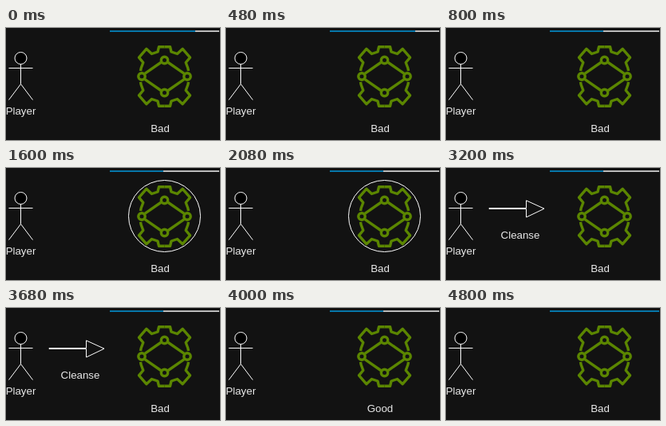
An HTML page that plays this animation: 268x141 px, repeating every 5.6 s.

```html
<!DOCTYPE html>
<html lang="en">
<head>
<meta charset="utf-8">
<title>Cleanse</title>
<style>
  html, body { margin: 0; width: 100%; height: 100%; overflow: hidden; background: #121212; }
  svg { display: block; width: 268px; height: 141px; }
  text { font: 13.3px "Liberation Sans", Arial, sans-serif; fill: #e8e8e8; text-anchor: middle; }
  .line { fill: none; stroke: #fff; }
  .gear { fill: none; stroke: #5b8600; stroke-width: 3.4; stroke-linejoin: round; }
</style>
</head>
<body>
<svg viewBox="0 0 268 141">
  <defs>
    <g id="quarter">
      <path d="M0-37.3H7L8.5-31 16-28.5 22.7-34.7 32-23.8 26.7-17.5 29.3-10.5 30-7"/>
      <path d="M4-18 24.6-3.6"/>
    </g>
    <g id="half">
      <use href="#quarter"/>
      <use href="#quarter" transform="scale(-1 1)"/>
      <circle cy="-20.5" r="4.2"/>
    </g>
  </defs>

  <rect x="130" y="3" width="137" height="2" fill="#bbb"/>
  <rect id="bar" x="130" y="3" height="2" fill="#0677aa"/>

  <g class="line">
    <circle cx="18.5" cy="38" r="7.5" fill="#000"/>
    <path d="M18.5 45.5V70.5M3.5 50.5H33.5M3.5 90.5 18.5 70.5 33.5 90.5"/>
  </g>
  <text x="18.5" y="109">Player</text>

  <g id="arrow">
    <path class="line" d="M54 50.5H100.5V40.9L123 51.2 100.5 62V51.5H54Z"/>
    <text x="93" y="89">Cleanse</text>
  </g>

  <circle id="ring" class="line" cx="198.5" cy="60.5" r="45"/>
  <g class="gear" transform="translate(198.5 61)">
    <use href="#half"/>
    <use href="#half" transform="scale(1 -1)"/>
    <circle cx="-28.5" r="4.2"/>
    <circle cx="28.5" r="4.2"/>
  </g>
  <text id="state" x="193" y="131">Bad</text>
</svg>
<script>
  const STEP = 800;
  const health = [107, 67, 67, 67, 67, 67, 137];
  const $ = id => document.getElementById(id);
  const show = (id, on) => $(id).setAttribute("visibility", on ? "visible" : "hidden");

  function draw() {
    const step = Math.floor(performance.now() / STEP) % health.length;
    $("bar").setAttribute("width", health[step]);
    show("ring", step === 2 || step === 3);
    show("arrow", step === 3 || step === 4);
    $("state").textContent = step === 5 ? "Good" : "Bad";
    requestAnimationFrame(draw);
  }
  draw();
</script>
</body>
</html>
```
